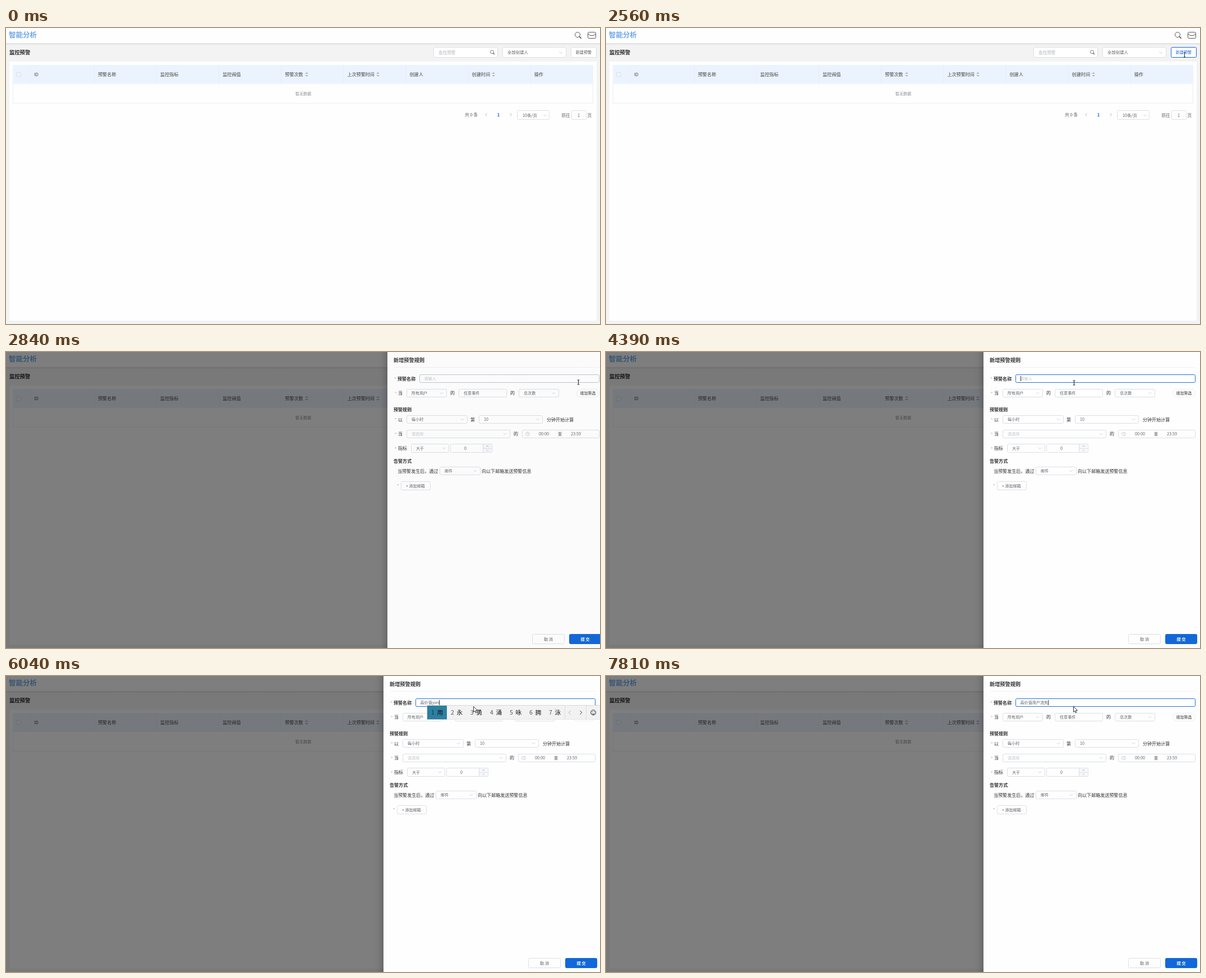
Recreate the animation shown at these times as an HTML page with a canvas. Size 1059 by 529 pixels, loop 8000 ms.

```html
<!DOCTYPE html>
<html lang="zh-CN">
<head>
<meta charset="utf-8">
<title>监控预警</title>
<style>
html, body { margin: 0; width: 100%; height: 100%; overflow: hidden; background: #f3f3f3; }
canvas { display: block; }
</style>
</head>
<body>
<canvas id="stage" width="1059" height="529"></canvas>
<script>
const W = 1059, H = 529, LOOP = 8000;
const page = document.getElementById('stage').getContext('2d');
const layer = document.createElement('canvas');
layer.width = W;
layer.height = H;
const panel = layer.getContext('2d');
let ctx = page;

const SANS = '"Noto Sans CJK SC", "Noto Sans CJK", "Noto Sans", sans-serif';
const BLUE = '#1268d8', LINE = '#dcdfe6', GREY = '#c0c4cc', BODY = '#606266', DARK = '#303133';

const OPEN = 2552, SHOWN = 2630, FOCUS = 3420, IME = 4490;
const DRAWER_X = 673, DRAWER_W = W - DRAWER_X;

// time, x, y of the pointer
const PATH = [
  [110, 926, 522], [450, 948, 330], [700, 1000, 160], [890, 1036, 78],
  [1100, 1040, 62], [1220, 1030, 44], [1330, 994, 48], [1450, 1031, 56],
  [1730, 1031, 56], [1760, 1031, 53], [1940, 1031, 53], [1970, 1030, 49],
  [2330, 1030, 48], [2360, 1031, 48.5], [2680, 1031, 48], [2840, 1020, 54],
  [3080, 925, 53], [3360, 834, 57], [3420, 834, 57], [3510, 834, 55]
];

// time, committed text, letters being composed, candidates
const HIGH = '高价 高架 告假 高家 高加 稿价 搞假';
const VALUE = '高价值 高价制 高价 高架 告假 高家 高加';
const USER = '用户 拥护 永和 用火 用好 永恒 用户';
const TYPING = [
  [0, '', '', ''],
  [4490, '', 'g', '个 给 过 高 该 改 跟'],
  [4560, '', 'ga', '嘎 噶 尬 尕 钆 伽 旮'],
  [4620, '', 'gao', '高 搞 告 稿 膏 糕 镐'],
  [4740, '', 'gaoj', HIGH],
  [4800, '', 'gaoji', '高级 告急 搞机 高 搞 告 稿'],
  [4980, '', 'gaojia', HIGH],
  [5180, '', 'gaojiaz', VALUE],
  [5260, '', 'gaojiazh', VALUE],
  [5340, '', 'gaojiazhi', VALUE],
  [5490, '高价值', '', ''],
  [5720, '高价值', 'y', '有 一 也 要 因为 已经 一个'],
  [5880, '高价值', 'yo', '哟 有 又 由 用 右 优'],
  [6040, '高价值', 'yon', '用 永 勇 涌 咏 拥 泳'],
  [6140, '高价值', 'yong', '用 永 勇 涌 咏 拥 泳'],
  [6230, '高价值', 'yongh', USER],
  [6310, '高价值', 'yonghu', USER],
  [6560, '高价值用户', '', ''],
  [6900, '高价值用户', 'l', '了 来 里 老 两 路 拉'],
  [6980, '高价值用户', 'li', '里 力 离 利 立 理 例'],
  [7060, '高价值用户', 'liu', '流 六 留 溜 柳 硫 瘤'],
  [7160, '高价值用户', 'lius', '流失 流逝 六十 流食 流速 柳树 留宿'],
  [7280, '高价值用户', 'liush', '流失 流逝 六十 流食 流沙 流水 留'],
  [7410, '高价值用户', 'liushi', '流失 流逝 六十 流食 留适 六时 六'],
  [7770, '高价值用户流失', '', '']
];

const clamp = v => Math.max(0, Math.min(1, v));

// CSS "ease" curve
function ease(p) {
  p = clamp(p);
  if (p === 1) return 1;
  let lo = 0, hi = 1, s = 0.5;
  for (let i = 0; i < 24; i++) {
    s = (lo + hi) / 2;
    const x = 0.75 * s * (1 - s) + s * s * s;
    if (x < p) lo = s; else hi = s;
  }
  return 0.3 * s * (1 - s) * (1 - s) + 3 * s * s * (1 - s) + s * s * s;
}

function text(str, x, cy, size, color = BODY, weight = 400, align = 'left') {
  ctx.font = `${weight} ${size}px ${SANS}`;
  ctx.textAlign = align;
  ctx.fillStyle = color;
  ctx.fillText(str, x, cy + size * 0.375);
}

function rect(x, y, w, h, color) {
  ctx.fillStyle = color;
  ctx.fillRect(x, y, w, h);
}

function box(x, y, x2, y2, color = LINE, r = 2, fill) {
  ctx.beginPath();
  ctx.roundRect(x + 0.5, y + 0.5, x2 - x - 1, y2 - y - 1, r);
  if (fill) { ctx.fillStyle = fill; ctx.fill(); }
  ctx.strokeStyle = color;
  ctx.lineWidth = 1;
  ctx.stroke();
}

function line(points, color, width = 1) {
  ctx.beginPath();
  points.forEach(([x, y]) => ctx.lineTo(x, y));
  ctx.strokeStyle = color;
  ctx.lineWidth = width;
  ctx.stroke();
}

function ring(x, y, r, color, width = 1, from = 0, to = Math.PI * 2) {
  ctx.beginPath();
  ctx.arc(x, y, r, from, to);
  ctx.strokeStyle = color;
  ctx.lineWidth = width;
  ctx.stroke();
}

function fillPoly(points, color) {
  ctx.beginPath();
  points.forEach(([x, y]) => ctx.lineTo(x, y));
  ctx.closePath();
  ctx.fillStyle = color;
  ctx.fill();
}

const chevDown = (x, y, c = GREY, s = 2.6) =>
  line([[x - s, y - s / 2], [x, y + s / 2], [x + s, y - s / 2]], c, 0.8);
const chevUp = (x, y) => line([[x - 2, y + 1], [x, y - 1], [x + 2, y + 1]], '#999', 0.8);
const chevSide = (x, y, dir, c, s = 2.6) =>
  line([[x - dir * s / 2, y - s], [x + dir * s / 2, y], [x - dir * s / 2, y + s]], c, 0.9);

function magnifier(x, y, r, color, width) {
  ring(x, y, r, color, width);
  const d = r * 0.72;
  line([[x + d, y + d], [x + d + r * 0.75, y + d + r * 0.75]], color, width * 1.7);
}

function select(x, y, x2, y2, label, color = BODY) {
  box(x, y, x2, y2);
  text(label, x + 9, (y + y2) / 2, 7.1, color);
  chevDown(x2 - 9.5, (y + y2) / 2);
}

function sorter(x) {
  fillPoly([[x - 3, 81.8], [x, 78.8], [x + 3, 81.8]], '#b4b8c0');
  fillPoly([[x - 3, 84], [x, 87], [x + 3, 84]], '#b4b8c0');
}

function mix(a, b, p) {
  return `rgb(${a.map((v, i) => Math.round(v + (b[i] - v) * p)).join(',')})`;
}

function drawPage(hover) {
  rect(0, 0, W, H, '#f3f3f3');
  const shade = ctx.createLinearGradient(0, 26, 0, 31);
  shade.addColorStop(0, '#d9d9d9');
  shade.addColorStop(1, '#f3f3f3');
  rect(0, 26, W, 5, shade);
  rect(0, 0, W, 27, '#fefefe');
  text('智能分析', 5, 12.3, 12.5, '#6fa7e6', 700);
  magnifier(1019, 12, 4.5, '#555', 1);
  box(1037, 7, 1052, 19, '#555', 2);
  line([[1037.5, 10.5], [1042, 13.5], [1047, 13.5], [1051.5, 10.5]], '#555', 1);

  text('监控预警', 6, 43.3, 9.3, '#222', 700);
  box(762, 34, 877, 53, LINE, 2, '#fff');
  text('查找预警', 771, 43.7, 7.6, '#b4b8c0');
  magnifier(866.5, 42.8, 2.9, '#666', 0.9);
  box(885, 34, 999, 53, LINE, 2, '#fff');
  text('全部创建人', 894, 43.7, 7.4, BODY);
  chevDown(989, 44);
  box(1007, 34, 1053, 53, mix([220, 223, 230], [18, 104, 216], hover), 2, '#fff');
  text('新建预警', 1015.7, 43.7, 7.1, mix([86, 88, 92], [18, 104, 216], hover));

  rect(6, 60, 1047, 463, '#fefefe');
  box(12, 66, 1047, 135, '#ebeef5', 0);
  rect(12, 66, 1035, 34, '#ebf4fe');
  box(18, 79, 27, 87, '#d8dde6', 1, '#f0f5fb');
  const heads = ['ID', '预警名称', '监控指标', '监控阀值', '预警次数', '上次预警时间', '创建人', '创建时间', '操作'];
  heads.forEach((label, i) => {
    const x = i ? 157 + (i - 1) * 111.1 : 43;
    rect(Math.round(x), 66, 1, 34, '#e3edf8');
    text(label, x + 7, 82.8, 8.1, '#444');
  });
  [536, 663, 869].forEach(sorter);
  text('暂无数据', 530, 117.3, 7.1, '#8a8d93', 400, 'center');

  text('共 0 条', 818, 155, 7.7);
  chevSide(856, 155, -1, '#aaa');
  text('1', 878, 155, 7.6, BLUE, 700, 'center');
  chevSide(900, 155, 1, '#aaa');
  box(911, 147, 969, 164);
  text('10条/页', 921, 155.8, 7.4);
  chevDown(961, 156, GREY, 2.2);
  text('前往', 990.5, 155.8, 7.6);
  box(1008, 147, 1035, 164);
  text('1', 1021, 155.8, 7.4, BODY, 400, 'center');
  text('页', 1036.5, 155.8, 7.6);
}

const star = (x, y) => text('*', x, y + 1.2, 7.5, '#ee8a72');
const label = (str, x, y, weight = 400) => text(str, x, y, 8.05, DARK, weight);

function drawDrawer(t, entry) {
  ctx.save();
  ctx.shadowColor = 'rgba(0,0,0,.35)';
  ctx.shadowBlur = 14;
  rect(DRAWER_X, -20, DRAWER_W + 40, H + 40, '#fefefe');
  ctx.restore();

  text('新增预警规则', 684, 14.3, 9.2, DARK, 700);
  rect(684, 27, 367, 1, '#f1f1f1');

  star(685, 47);
  label('预警名称', 691, 47.5, 700);
  const focus = clamp((t - FOCUS) / 90);
  const idle = t > 2740 ? [192, 196, 204] : [220, 223, 230];
  box(730, 40, 1051, 55, mix(idle, [32, 116, 222], focus));
  const value = entry[1] + entry[2];
  text(value || '请输入', 738.5, 47.7, 7.1, value ? BODY : GREY);
  if (t >= FOCUS && !(t >= 3870 && t < 4390)) {
    const end = value ? ctx.measureText(value).width : 0;
    rect(Math.round(738.7 + end), 43, 1, 9, '#333');
  }

  star(686, 73);
  label('当', 692, 73.3);
  select(707, 66, 779, 81, '所有用户');
  label('的', 785, 73.3);
  box(800, 66, 886, 81);
  text('任意事件', 809, 73.5, 7.1);
  label('的', 892, 73.3);
  select(907, 66, 979, 81, '总次数');
  box(1010, 66, 1051, 81, '#eceef2', 7);
  text('增加筛选', 1016.5, 73.3, 6.9, DARK);

  label('预警规则', 684, 102.5, 700);
  star(686, 120);
  label('以', 692, 120.5);
  select(707, 113, 816, 128, '每小时');
  label('第', 821, 120.5);
  select(836, 113, 950, 128, '10');
  label('分钟开始计算', 957, 120.5);

  star(686, 146);
  label('当', 692, 146.3);
  select(707, 139, 892, 154, '请选择', GREY);
  label('的', 898, 146.3);
  box(913, 139, 1051, 154);
  ring(923, 146.5, 3.3, GREY, 0.8);
  line([[923, 144.5], [923, 146.7], [924.8, 146.7]], GREY, 0.8);
  text('00:00', 952, 146.5, 7.2, BODY, 400, 'center');
  text('至', 977, 146.5, 7.2, DARK);
  text('23:59', 1009, 146.5, 7.2, BODY, 400, 'center');

  star(686, 172);
  label('指标', 692, 172.3);
  select(715, 164, 783, 180, '大于');
  rect(843, 165, 15, 14, '#f5f7fa');
  box(785, 164, 860, 180);
  rect(843, 165, 1, 14, LINE);
  rect(843, 172, 16, 1, LINE);
  text('0', 812, 172.3, 7.2, BODY, 400, 'center');
  chevUp(851.5, 168.3);
  chevDown(851.5, 176, GREY, 2);

  label('告警方式', 684, 195, 700);
  label('当预警发生后，通过', 691, 212.7);
  select(766, 205, 839, 220, '邮件');
  label('向以下邮箱发送预警信息', 841, 212.7);
  star(690, 238);
  box(697, 231, 750, 247);
  text('+ 添加邮箱', 706, 239.4, 7.1);

  box(931, 504, 989, 522);
  text('取 消', 960, 513.3, 7.3, BODY, 400, 'center');
  box(997, 504, 1054, 522, BLUE, 2, BLUE);
  text('提 交', 1025.5, 513.3, 7.3, '#fff', 700, 'center');
}

// The drawer fades as one piece, so it is painted on its own layer first.
function slideDrawer(t, entry) {
  const slide = ease((t - OPEN) / 349);
  ctx = panel;
  ctx.clearRect(0, 0, W, H);
  drawDrawer(t, entry);
  ctx = page;
  ctx.globalAlpha = slide;
  ctx.drawImage(layer, Math.round((1 - slide) * DRAWER_W), 0);
  ctx.globalAlpha = 1;
}

function drawCandidates(list) {
  const words = list.split(' ');
  const width = w => 24.7 + 10.3 * w.length;
  const left = 996 - words.reduce((sum, w) => sum + width(w), 0);
  rect(left - 0.5, 52, W - left + 1, 26, '#d8d8d8');
  rect(left, 53, W - left, 24.5, '#f2f2f2');
  let x = left;
  words.forEach((word, i) => {
    if (!i) rect(x, 53, width(word), 24.5, '#2d7f9f');
    text(String(i + 1), x + 10, 65.2, 10.4, i ? '#555' : '#163642', 400, 'center');
    text(word, x + 17.6, 65.2, 10.7, '#111');
    x += width(word);
  });
  rect(996, 53, 1, 24.5, '#dcdcdc');
  rect(1034, 53, 1, 24.5, '#dcdcdc');
  chevSide(1005, 65.3, -1, '#aaa', 3.4);
  chevSide(1025, 65.3, 1, '#222', 3.4);
  ring(1047, 65.3, 4.5, '#222');
  ring(1047, 65.8, 2.4, '#222', 0.9, 0.3, Math.PI - 0.3);
  rect(1044.8, 63.2, 1.2, 1.2, '#222');
  rect(1048, 63.2, 1.2, 1.2, '#222');
}

function pointerAt(t) {
  const i = PATH.findIndex(p => p[0] > t);
  if (i < 0) return PATH[PATH.length - 1].slice(1);
  const a = PATH[i - 1], b = PATH[i];
  const p = (t - a[0]) / (b[0] - a[0]);
  return [a[1] + (b[1] - a[1]) * p, a[2] + (b[2] - a[2]) * p];
}

function drawArrow(x, y) {
  const shape = [[0, 0], [0, 10], [2.3, 7.9], [3.9, 11.3], [5.3, 10.6], [3.8, 7.3], [7, 7]]
    .map(([dx, dy]) => [x + dx, y + dy]);
  fillPoly(shape, '#fff');
  line([...shape, shape[0]], '#222', 0.9);
}

function drawBeam(x, y) {
  x = Math.round(x) + 0.5;
  line([[x, y - 4], [x, y + 4]], '#222', 1);
  for (const dy of [-4, 4]) line([[x - 2, y + dy], [x + 2, y + dy]], '#222', 0.9);
}

function render(t) {
  let hover = clamp((t - 1970) / 100);
  if (t < 1400) hover = clamp((t - 1160) / 100) * clamp((1360 - t) / 100);
  const entry = TYPING.filter(e => e[0] <= t).pop();

  drawPage(hover);
  if (t >= SHOWN) {
    rect(0, 0, W, H, `rgba(0,0,0,${0.5 * ease((t - OPEN) / 233)})`);
    slideDrawer(t, entry);
  }
  if (entry[3]) drawCandidates(entry[3]);

  if (t < 110) return;
  const [x, y] = pointerAt(t);
  if (t >= IME) drawArrow(833.5, 54.5);
  else if (t < 1400) drawArrow(x, y);
  else drawBeam(x, y);
}

const start = performance.now();
function tick() {
  render((performance.now() - start) % LOOP);
  requestAnimationFrame(tick);
}
tick();
</script>
</body>
</html>
```
